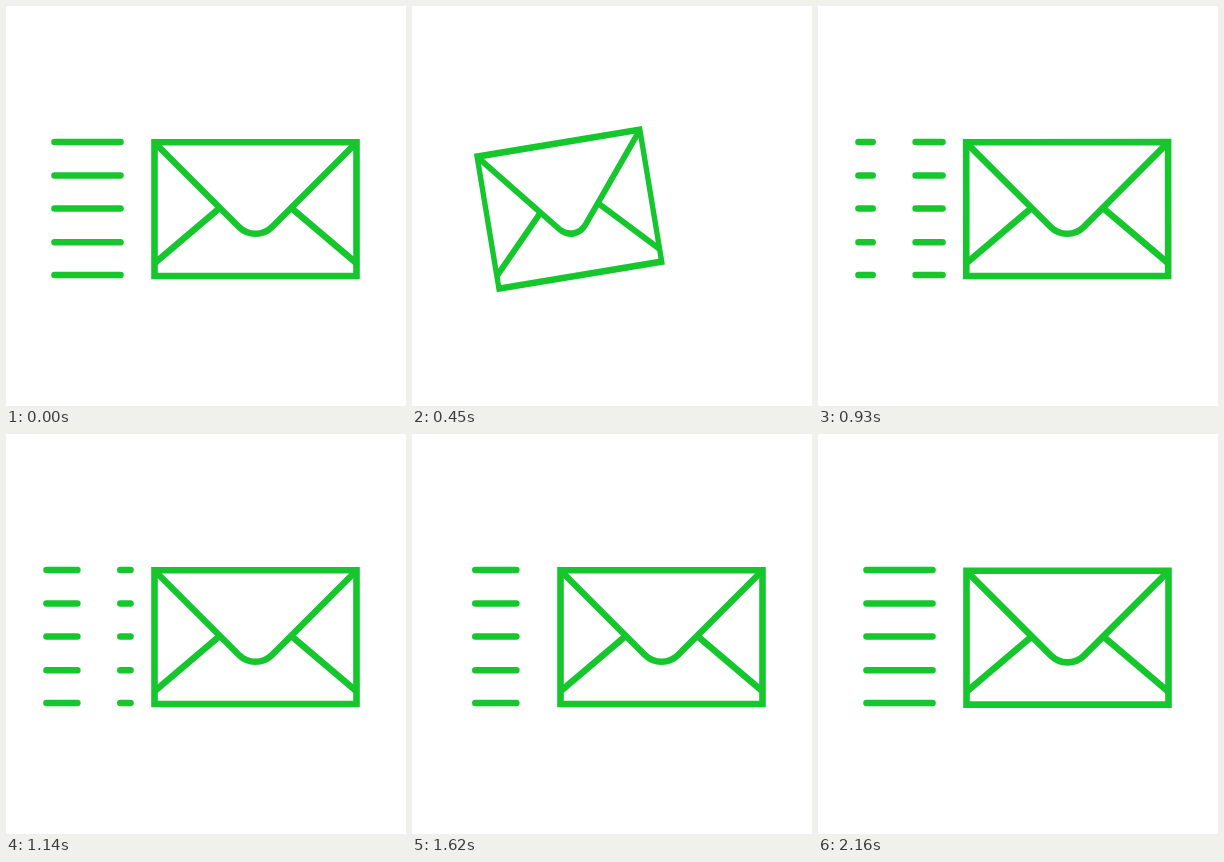
Write an HTML page that moves like this. It is 400 px wide and 400 px high and loops after 2190 ms.

```html
<!DOCTYPE html>
<html lang="en">
<head>
<meta charset="utf-8">
<title>Sending mail</title>
<style>
  html, body { margin: 0; width: 100%; height: 100%; overflow: hidden; background: #fff; }
  svg { display: block; width: 100vw; height: 100vh; }
</style>
</head>
<body>
<svg viewBox="0 0 400 400" fill="none" stroke="#15c62d" stroke-width="6.6" stroke-linejoin="round" stroke-linecap="round">
  <path id="trails"/>
  <g id="envelope">
    <path stroke-linejoin="miter" d="M148.5 136.2H350.5V270H148.5Z"/>
    <path d="M150 138L233 221C242 230 257 230 266 221L349 138"/>
    <path d="M150 256L212.5 203M349 256L286.5 203"/>
  </g>
</svg>
<script>
  const STEP = 30, STEPS = 73;
  const LEFT = 40.5, SPAN = 84, REST = 48.5;
  const ROWS = [136, 169.5, 202.5, 236.3, 269];
  const CENTER = { x: 249.5, y: 203 };

  // Keys are [step, value]; the curves between them never overshoot.
  const pull = curve([[0, 0], [8.5, .5], [15, .94], [17, 1], [18, .88], [23, .112], [31, .003], [33, 0]]);
  const travel = curve([[15, 0], [23, .1], [31, .283], [45, .593], [63, .907], [72, 1]]);
  const length = curve([[0, 66], [13, 0], [22.6, 0], [23, 1], [31, 41], [63, 41], [72, 66]]);
  const sag = curve([[69, 0], [72, .6]]);

  function curve(keys) {
    const slopes = keys.slice(1).map(([x, y], i) => (y - keys[i][1]) / (x - keys[i][0]));
    const tangents = keys.map((_, i) => {
      const a = slopes[i - 1] || 0, b = slopes[i] || 0;
      return a * b > 0 ? 2 * a * b / (a + b) : 0;
    });
    return x => {
      if (x <= keys[0][0]) return keys[0][1];
      const i = keys.findIndex(key => key[0] >= x) - 1;
      if (i < 0) return keys[keys.length - 1][1];
      const [x0, y0] = keys[i], [x1, y1] = keys[i + 1];
      const w = x1 - x0, u = (x - x0) / w, v = 1 - u;
      return y0 * v * v * (1 + 2 * u) + y1 * u * u * (1 + 2 * v)
        + w * u * v * (tangents[i] * v - tangents[i + 1] * u);
    };
  }

  function trailPath(step) {
    const size = length(step);
    if (size < .5) return "";
    const shift = REST - LEFT - 5 * SPAN * travel(step);
    const start = LEFT + (shift % SPAN + SPAN) % SPAN;
    const end = start + size, right = LEFT + SPAN;
    const parts = end > right ? [[start, right], [LEFT, end - SPAN]] : [[start, end]];
    return ROWS.map(y => parts.map(([a, b]) => `M${a} ${y}H${b}`).join("")).join("");
  }

  const trails = document.getElementById("trails");
  const envelope = document.getElementById("envelope");

  function draw(step) {
    const p = pull(step);
    trails.setAttribute("d", trailPath(step));
    envelope.setAttribute("transform",
      `translate(${CENTER.x - 98 * p} ${CENTER.y + sag(step)}) rotate(${-10 * p}) ` +
      `scale(${1 - .195 * p} 1) translate(${-CENTER.x} ${-CENTER.y})`);
  }

  const began = performance.now();
  function tick() {
    draw(Math.floor((performance.now() - began) / STEP) % STEPS);
    requestAnimationFrame(tick);
  }
  tick();
</script>
</body>
</html>
```
